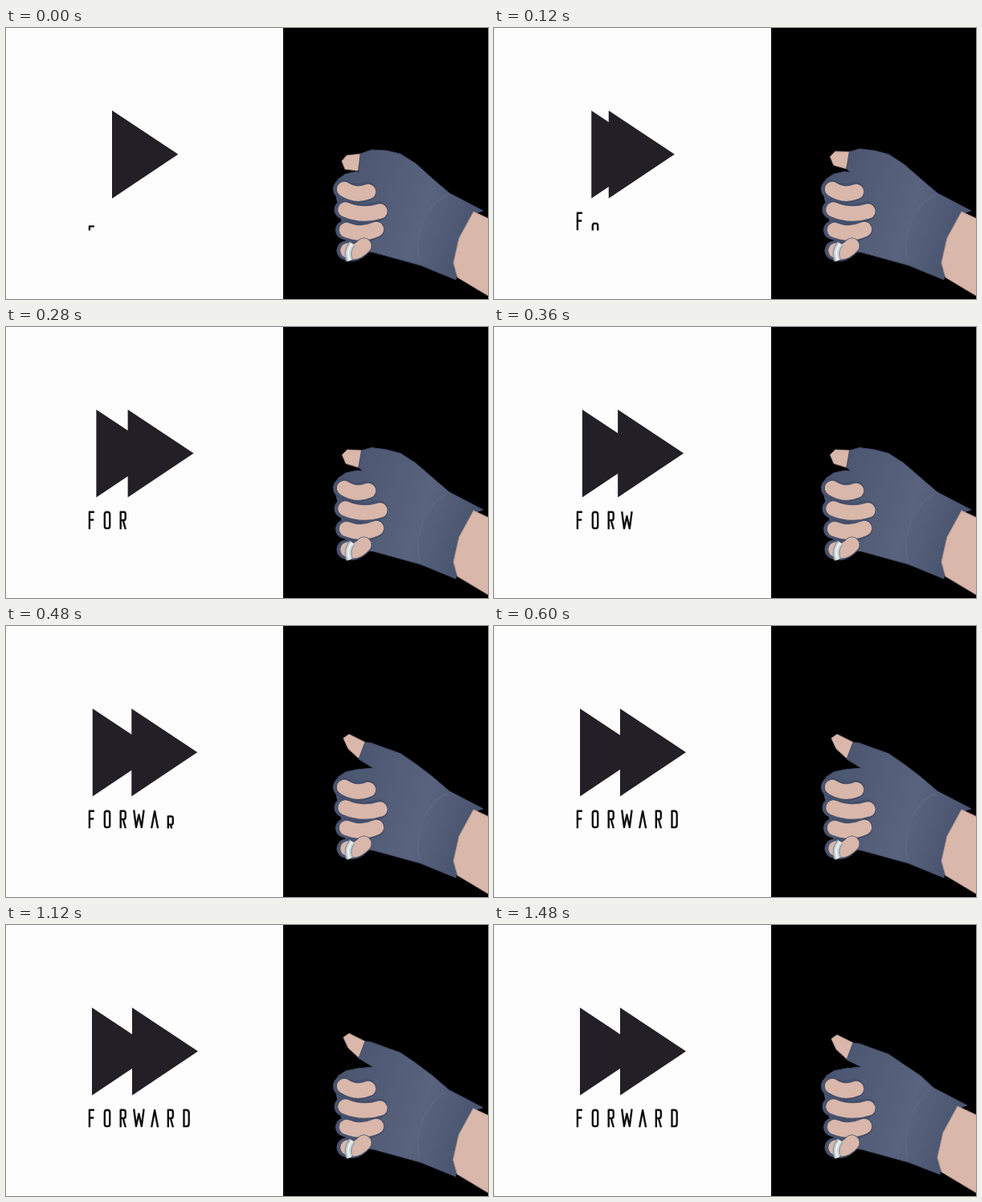
Animation, 600 px wide and 338 px high, one loop 1.52 s. Source, as an HTML page with a canvas:

```html
<!DOCTYPE html>
<html lang="en">
<head>
<meta charset="utf-8">
<title>Forward</title>
<style>
  html, body { margin: 0; height: 100%; overflow: hidden; background: #000; }
  canvas { display: block; }
</style>
</head>
<body>
<canvas id="stage" width="600" height="338" role="img" aria-label="FORWARD"></canvas>
<script>
const c = document.getElementById('stage').getContext('2d');
const LOOP = 1520, STEP = 40;
const INK = '#222026', SKIN = '#d9b7aa', SKIN_EDGE = '#ae928b';
const GLOVE = '#4a5570', GLOVE_EDGE = '#414b66';

const clamp = v => Math.max(0, Math.min(1, v));
const smooth = v => v * v * (3 - 2 * v);
const phase = (t, start, length) => clamp((t - start) / length);
const mix = (a, b, k) => a + (b - a) * k;

function poly(points, fill, edge) {
  c.beginPath();
  for (const [x, y] of points) c.lineTo(x, y);
  c.closePath();
  c.fillStyle = fill;
  c.fill();
  if (edge) line(null, edge, 1);
}

function line(path, color, width) {
  c.strokeStyle = color;
  c.lineWidth = width;
  path ? c.stroke(path) : c.stroke();
}

// Glyph strokes, centred on x = 0, from y = 0 down to the baseline at 23
const glyphs = {
  F: 'M-2.4 23V1.3H3.6M-2.4 11H3',
  O: 'M-3.2 4Q-3.2 1.3 0 1.3T3.2 4V19Q3.2 21.8 0 21.8T-3.2 19Z',
  R: 'M-3 23V1.3H1Q3 1.3 3 4V8.5Q3 11.5 1 11.5H-3M0 11.5L3.2 23',
  W: 'M-6.2 0L-3.4 21.5L0 6L3.4 21.5L6.2 0',
  A: 'M-4 23L0 1.5L4 23',
  D: 'M-3 1.3H0Q3.2 1.3 3.2 5V18Q3.2 21.8 0 21.8H-3Z'
};
const word = [...'FORWARD'].map(ch => new Path2D(glyphs[ch]));

function drawSign(t) {
  c.fillStyle = '#fefdfe';
  c.fillRect(0, 0, 345, 338);

  const spread = 25 * (1 - (1 - phase(t, 0, 700)) ** 3);
  for (const x of [132 - spread, 132 + spread])
    poly([[x, 103], [x + 82, 157.5], [x, 212.5]], INK);

  // Letters rise from below the baseline, each a little sooner after the last
  c.save();
  c.beginPath();
  c.rect(90, 225, 160, 27.5);
  c.clip();
  c.lineJoin = 'round';
  word.forEach((path, i) => {
    const p = phase(t, 117 * i - 5.2 * i * i - 12, 80);
    if (!p) return;
    c.save();
    c.translate(106.3 + 19.7 * i, 229.5 + 23 * (1 - p) ** 2);
    line(path, '#111013', 2.4);
    c.restore();
  });
  c.restore();
}

function drawThumbTip(lift, sag) {
  const at = (x, y, upX, upY) => [mix(x, upX, lift), mix(y, upY, lift) + sag];
  poly([
    at(422, 176, 426, 153), at(418, 166, 420, 140), at(424, 159, 427, 135),
    at(442, 157, 447, 145), at(438, 178, 440, 166)
  ], SKIN, SKIN_EDGE);
}

function drawGlove(lift, sag, wrist) {
  const at = (x, y, rise) => [x, y - rise * lift + sag];
  const shade = c.createLinearGradient(410, 200, 575, 255);
  shade.addColorStop(0, GLOVE);
  shade.addColorStop(0.65, '#59637d');
  shade.addColorStop(1, GLOVE);
  poly([
    [mix(440, 457, lift), 181 - 4 * lift], at(439, 178, 12),
    at(mix(441, 447, lift), 157, 12), at(455, 152, 6), at(474, 153, 0),
    at(491, 157, -2), at(510, 169, -3), [531, 188],
    wrist(552, 206), wrist(594, 228), wrist(582, 232), wrist(560, 314),
    [516, 296], [458, 280], [425, 275], [411, 210], [409, 195],
    [414, 188], [423, 182], [437, 179]
  ], shade, GLOVE_EDGE);

  // Cuff seam
  c.beginPath();
  c.moveTo(...wrist(548, 209));
  c.bezierCurveTo(520, 223, 508, 262, 515, 292);
  line(null, '#5f6881', 1.5);
}

function drawArm(wrist) {
  poly([
    wrist(582, 229), wrist(612, 243), wrist(612, 341),
    wrist(562, 311), wrist(557, 293), wrist(564, 262)
  ], SKIN, SKIN_EDGE);
}

// Curled fingers: sagging round strokes, a dark sleeve behind each
const fingers = [30, 43, 37, 20].map((length, i) => {
  const x = 421 + 1.5 * i, y = 201 + 25.5 * i, turn = 3 - i * i;
  return new Path2D(`M${x} ${y}q${length / 2} ${turn / 2 + 8} ${length} ${turn}`);
});

function drawFist() {
  c.lineCap = 'round';
  c.save();
  c.translate(-2, 0);
  for (const f of fingers) line(f, GLOVE_EDGE, 24);
  for (const f of fingers) line(f, GLOVE, 22);
  c.restore();
  for (const f of fingers) {
    line(f, GLOVE_EDGE, 20);
    line(f, SKIN, 18.5);
  }
  c.lineCap = 'butt';

  const ring = new Path2D('M431 269Q423 279 428 290');
  line(ring, '#929da3', 9);
  line(ring, '#d0d8da', 6);
  line(ring, '#eef2f2', 2);
}

function drawHand(t) {
  const lift = 0.25 * smooth(phase(t, 0, 160)) + 0.75 * smooth(phase(t, 360, 120));
  const turn = phase(t, 960, 520) ** 2;
  const wrist = (x, y) => [x - 5 * turn, y - 3 * turn];
  drawThumbTip(lift, 2 * turn);
  drawGlove(lift, 2 * turn, wrist);
  drawArm(wrist);
  drawFist();
}

function draw(t) {
  c.fillStyle = '#000';
  c.fillRect(0, 0, 600, 338);
  drawSign(t);
  drawHand(t);
}

const begin = performance.now();
function tick() {
  const t = (performance.now() - begin) % LOOP;
  draw(Math.floor(t / STEP) * STEP);
  requestAnimationFrame(tick);
}
tick();
</script>
</body>
</html>
```
